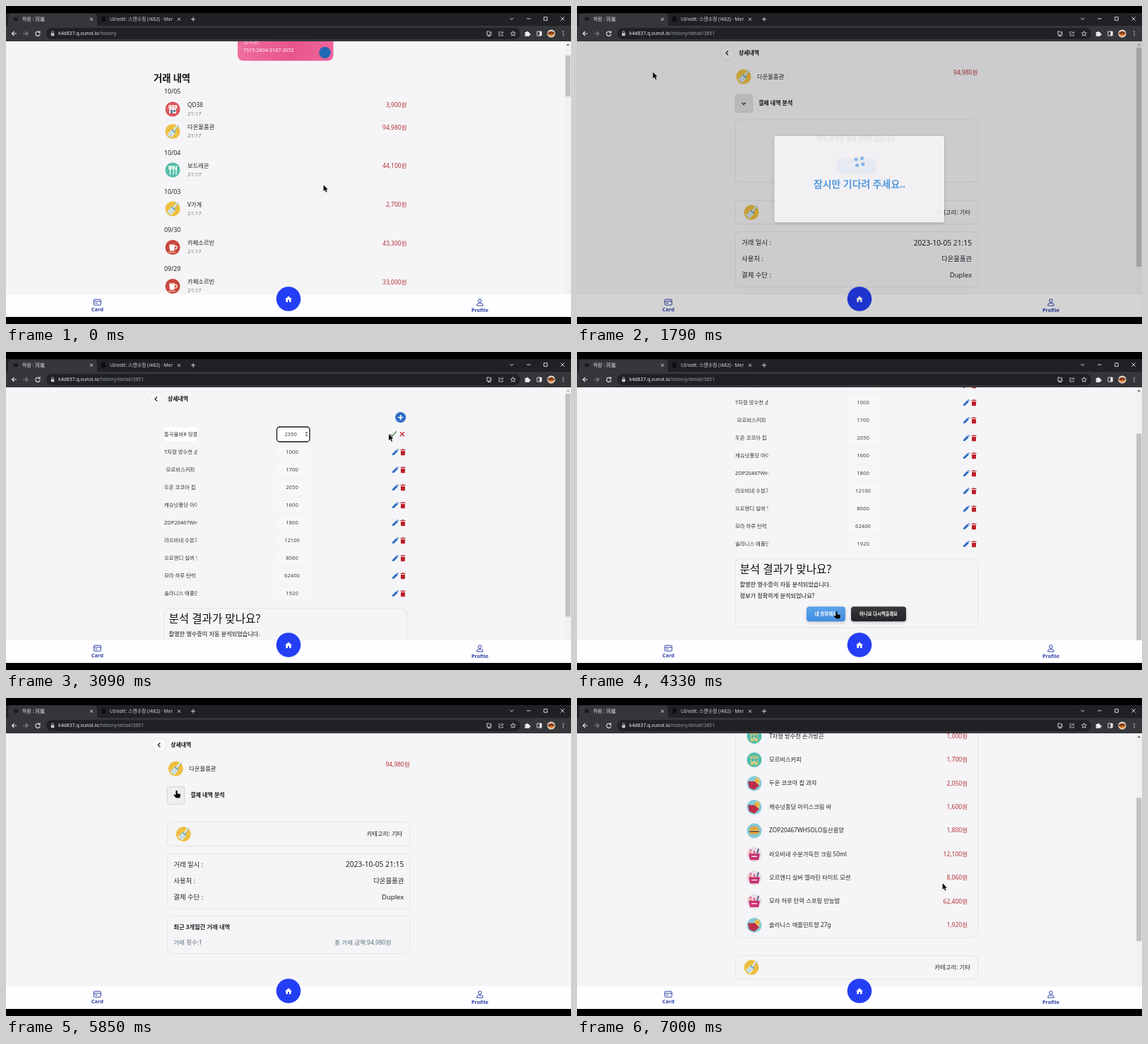
These frames come from a looping animation (800x450 px, 7.03 s). An HTML page with a canvas:

```html
<!DOCTYPE html>
<html lang="ko">
<head>
<meta charset="utf-8">
<style>
html, body { margin: 0; width: 100%; height: 100%; overflow: hidden; background: #000; }
canvas { display: block; }
</style>
</head>
<body>
<canvas id="stage" width="800" height="450"></canvas>
<script>
const c = document.getElementById('stage').getContext('2d');
const LOOP = 7030;
const FONT = '"Noto Sans", "Noto Sans CJK KR", sans-serif';
const RED = '#b3333a', BLUE = '#2c40a8', INK = '#25242a';
const STORE = '다온물품관';

const history = [
  ['10/05', 121], ['10/04', 208], ['10/03', 262.5], ['09/30', 317], ['09/29', 372]
];
const spending = [
  ['shop', 'QD38', '3,900원', 146], ['brush', STORE, '94,980원', 177.5],
  ['fork', '보드레온', '44,100원', 232], ['brush', 'V가게', '2,700원', 287],
  ['cup', '카페소르빈', '43,300원', 341.5], ['cup', '카페소르빈', '33,000원', 396.5]
];
const items = [
  ['통곡물바R 땅콩버터', 2350, 'snack'],
  ['T자형 방수천 손가방끈', 1000, 'drink'],
  ['모르비스커피', 1700, 'drink'],
  ['두온 코코아 칩 과자', 2050, 'snack'],
  ['캐슈넛퐁당 아이스크림 바', 1600, 'snack'],
  ['ZOP20467WHSOLO등산용양', 1800, 'burger'],
  ['라오비네 수분가득한 크림 50ml', 12100, 'makeup'],
  ['오르엔디 실버 엘라틴 타이트 모션', 8060, 'makeup'],
  ['모라 하루 탄력 스프링 만능밤', 62400, 'makeup'],
  ['솔라니스 애플민트향 27g', 1920, 'snack']
];

// Disc colour, then parts: colour, path, optional line width
const icons = {
  shop: ['#dc555b', ['#f7e9e4', 'M-5-1H5V6H-5Z'], ['#f3b9b4', 'M-6-6H6L7-1H-7Z'],
    ['#5b7f9d', 'M-3 1H0V6H-3ZM1 1H4V4H1Z'], ['#fff', 'M-3-6V-1M1-6V-1M5-6V-1', 1.3]],
  brush: ['#edbf42', ['#d9e8ec', 'M7.5-9.5L1-1', 2.6], ['#8f9a94', 'M8.5-8.5L2.5-.5', .7],
    ['#e3edee', 'M-1-3L4 1L-2 9L-8 4Z'], ['#5d9fc4', 'M-1-3L4 1L3 2.5L-2-1.5Z'],
    ['#6aa7c6', 'M-2.5 0L-6 5M0 2L-4 7.5', .9]],
  fork: ['#55bda9', ['#fff', 'M-5-6V-2Q-5 0-3.5 0Q-2-0-2-2V-6M-3.5-6V7M1-6V7M5 0V7', 1.2],
    ['#fff', 'M-.5-6H2.5V-1H-.5ZM3.5 0Q3.5-7 6-6V0Z']],
  cup: ['#c9473d', ['#fff', 'M-5-4H3L2 5H-4Z'], ['#fff', 'M3-2Q7-2 6 1Q5 3 2.5 2.5', 1.3],
    ['#ecc9b9', 'M-5-4H3V-2.5H-5Z'], ['#edc39f', 'M-6 7H4', 1.2]],
  drink: ['#54bfa9', ['#e9c46a', 'M-6-5H6V-3H-6ZM-5 3H-1V7H-5ZM1 3H5V7H1Z'],
    ['#f8e8bd', 'M-4-2V2M0-2V5M4-2V2', 1.5], ['#3d7f78', 'M-6 0H6', .8]],
  snack: ['#86cbd8', ['#f0c24d', 'M-1-3L4-9L8-5L6 3Z'], ['#b92f49', 'M-9-3L1-3L7 3L0 9L-7 6Z'],
    ['#df8d35', 'M2-5L6-3', 1.2]],
  burger: ['#86c9d4', ['#e6a13d', 'M-7-1Q-6-6 0-6Q6-6 7-1Z'], ['#e6a13d', 'M-7 2H7Q6 5 4 5H-4Q-6 5-7 2Z'],
    ['#7b4a31', 'M-7 1H7', 1.8], ['#f5d95b', 'M-7-.5H7', 1]],
  makeup: ['#eadbe6', ['#c9316f', 'M-8-1H8L6 8H-6Z'], ['#d75b8d', 'M-5-1V-7M0-1V-5', 2.4],
    ['#59638f', 'M4-1L6-8', 2], ['#f3b49b', 'M-8-5H-4V-2H-8Z'], ['#fff', 'M-4 3H4', 1.3]]
};

const clamp = v => Math.max(0, Math.min(1, v));
const ramp = (t, a, b) => clamp((t - a) / (b - a));
const ease = p => p * p * (3 - 2 * p);

function text(s, x, y, size, color = INK, weight = 400, align = 'left') {
  c.font = `${weight} ${size}px ${FONT}`;
  c.fillStyle = color;
  c.textAlign = align;
  c.fillText(s, x, y + size * .36);
  return c.measureText(s).width;
}
function paint(fill, stroke, width = 1) {
  if (fill) { c.fillStyle = fill; c.fill(); }
  if (stroke) { c.strokeStyle = stroke; c.lineWidth = width; c.stroke(); }
}
function box(x, y, w, h, r, fill, stroke, width) {
  c.beginPath();
  c.roundRect(x, y, w, h, r);
  paint(fill, stroke, width);
}
function disc(x, y, r, fill, stroke, width) {
  c.beginPath();
  c.arc(x, y, r, 0, 7);
  paint(fill, stroke, width);
}
function path(d, x, y, fill, stroke, width = 1) {
  const p = new Path2D(d);
  c.save();
  c.translate(x, y);
  if (fill) { c.fillStyle = fill; c.fill(p); }
  if (stroke) { c.strokeStyle = stroke; c.lineWidth = width; c.stroke(p); }
  c.restore();
}
function clipped(x, y, w, h, draw) {
  c.save();
  c.beginPath();
  c.rect(x, y, w, h);
  c.clip();
  draw();
  c.restore();
}
function icon(kind, x, y) {
  const [back, ...parts] = icons[kind];
  disc(x, y, 10.5, back);
  for (const [color, d, width] of parts) path(d, x, y, width ? null : color, width && color, width);
}
const panel = (y, h) => box(224, y, 343.5, h, 7, null, '#e4e3e6');

function button(label, x, y, w, top, bottom, size) {
  const g = c.createLinearGradient(0, y, 0, y + 21);
  g.addColorStop(0, top);
  g.addColorStop(1, bottom);
  c.save();
  c.shadowColor = '#0003';
  c.shadowBlur = 4;
  c.shadowOffsetY = 1.5;
  box(x, y, w, 21, 4, g);
  c.restore();
  text(label, x + w / 2, y + 10.3, size, '#fff', 700, 'center');
}

function historyPage() {
  const g = c.createLinearGradient(328, 0, 463, 0);
  g.addColorStop(0, '#ef6d9c');
  g.addColorStop(.55, '#e8558d');
  g.addColorStop(1, '#f0659b');
  box(328, 0, 135.5, 77.5, 8, g);
  text('한가온', 336, 50, 8, '#fff');
  text('7315-2604-9187-3052', 336, 62, 7.1, '#fff');
  text('· ····', 338, 74, 6, '#f7a9c5');
  disc(451.5, 66, 8.3, '#2468b4');
  text('거래 내역', 209, 102, 13.2, '#111', 700);
  for (const [date, y] of history) text(date, 224, y, 8.8);
  for (const [kind, name, price, y] of spending) {
    icon(kind, 236, y);
    text(name, 257, y - 6, 8.3);
    text('21:17', 257, y + 6, 7.7, '#77767b');
    text(price, 567.5, y - 6, 8.5, RED, 400, 'right');
    box(224, y + 15, 343, .7, 0, '#efeef1');
  }
}

function header() {
  disc(212.5, 66.5, 10, '#f8f7f9', '#e5e4e7');
  path('M1.5-3L-1.5 0L1.5 3', 212.5, 66.5, null, '#222', 1.2);
  text('상세내역', 229, 66, 7.9, '#111', 700);
}

function detailPage(view, t) {
  header();
  icon('brush', 236, 100);
  text(STORE, 255, 100, 8.3);
  text('94,980원', 567.5, 94, 8.5, RED, 400, 'right');
  box(224, 125.5, 24.5, 25, 2, view === 'empty' ? '#e0dee0' : '#eeedf0', '#cfced1', .8);
  path('M-2.7-1.3L0 1.4L2.7-1.3', 236, 138, null, '#222', 1.2);
  text('결제 내역 분석', 257, 137, 8, '#111', 700);

  let y = 175.7;
  if (view === 'empty') {
    panel(161, 88.5);
    text('아직 분석한 결제 내역이 없습니다.', 396, 188.5, 7.9, '#111', 700, 'center');
    const pressed = t > 820 && t < 1100;
    button('영수증 등록', 368, 216, 55, pressed ? '#69aaea' : '#5ba3ea', pressed ? '#58a0e8' : '#448fe0', 6.3);
    y = 275;
  } else if (view === 'full') {
    panel(161, 336);
    items.forEach(([name, price, kind], i) => {
      const row = 178.8 + i * 33.4;
      icon(kind, 251, row);
      text(name, 272, row - .5, 8.3);
      text(price.toLocaleString('en-US') + '원', 553, row - .5, 8.5, RED, 400, 'right');
    });
    y = 522.3;
  }

  panel(y, 33.5);
  icon('brush', 247, y + 17);
  text('카테고리: 기타', 557, y + 16.5, 8.4, INK, 400, 'right');
  panel(y + 44.5, 78);
  [['거래 일시 :', '2023-10-05 21:15', 10.25], ['사용처 :', STORE, 9.3], ['결제 수단 :', 'Duplex', 9.5]]
    .forEach(([label, value, size], i) => {
      text(label, 233, y + 60 + i * 23, 9.4);
      text(value, 559, y + 60 + i * 23, size, INK, 400, 'right');
    });
  panel(y + 133, 53);
  text('최근 3개월간 거래 내역', 233, y + 148, 8.3, INK, 600);
  text('거래 횟수:1', 233, y + 170, 8.5, '#5d7480');
  text('총 거래 금액:94,980원', 461, y + 170, 8.5, '#5d7480');
}

function reviewPage(editing) {
  header();
  disc(558.7, 92.5, 7.6, '#2f6fc6');
  path('M-3.5 0H3.5M0-3.5V3.5', 558.7, 92.5, null, '#fff', 1.6);
  items.forEach(([name, price], i) => {
    const y = 116.3 + i * 25, edit = editing && !i;
    if (edit) {
      box(224, y - 10, 46.5, 20, 3, '#fff');
      box(383.5, y - 10.3, 46.5, 21, 4, '#fff', '#161616', 1.3);
      path('M-2-1L0-3.5L2-1ZM-2 1L0 3.5L2 1Z', 425.5, y, '#555');
      path('M-4 0L-1 3L5-4', 548, y, null, '#4d8a50', 1.4);
      path('M-3-3L3 3M3-3L-3 3', 561, y, null, '#c03036', 1.5);
    } else {
      box(383.5, y - 9, 46.5, 18, 3, '#f7f6f8');
      path('M-4 4V1.8L1.7-3.9L3.9-1.7L-1.8 4ZM2.4-4.5L3.3-5.2L5.2-3.3L4.5-2.4Z', 551, y + .8, '#2f6fc6');
      path('M-3-2H3V3.3Q3 4.3 2 4.3H-2Q-3 4.3-3 3.3ZM-3.6-4H-1.5L-1-4.6H1L1.5-4H3.6V-2.8H-3.6Z', 562, y + .6, '#bd2029');
    }
    c.font = `400 7.4px ${FONT}`;
    const w = c.measureText(name).width;
    clipped(224, y - 10, 46.5, 20, () => text(name, Math.max(224, 247 - w / 2), y - .3, 7.4, '#333'));
    text(price, edit ? 403 : 405, y - .3, 7.7, '#444', 400, 'center');
  });
  panel(362.8, 97);
  text('분석 결과가 맞나요?', 230.5, 377.5, 15.6, '#111', 500);
  text('촬영한 영수증이 자동 분석되었습니다.', 230.5, 399.3, 8.2, '#111', 500);
  text('정보가 정확하게 분석되었나요?', 230.5, 415, 8.2, '#111', 500);
  button('네 정확해요', 325, 430.3, 55, '#5ba3ea', '#3f8ce0', 6.5);
  button('아니요 다시찍을래요', 388, 430.3, 78, '#3c393d', '#242226', 6.3);
}

function scrollbar(height, top) {
  box(791.5, 50, 8.5, 390, 0, '#f1f1f1');
  path('M-2.2 1L0-1.4L2.2 1Z', 795.7, 55, top ? '#555' : '#a8a8a8');
  box(792.2, 59 + top * 372 / height, 7, 390 * 372 / height, 0, '#c1c1c1');
}

function navigation() {
  box(0, 408, 800, 32, 0, '#fefdff');
  box(124.3, 415.2, 10, 8, 1, null, BLUE, 1);
  path('M-5 0H5M-3 2.5H0', 129.3, 418, null, BLUE, 1.2);
  text('Card', 129.3, 429.7, 7.4, BLUE, 600, 'center');
  disc(671, 417, 2.3, null, BLUE, 1);
  path('M-4.2 4V3Q-4 .5-1.5.5H1.5Q4 .5 4.2 3V4Z', 671, 420, null, BLUE, 1);
  text('Profile', 671, 430, 7.4, BLUE, 600, 'center');
  disc(400, 414.5, 17.3, '#243ef5');
  path('M0-4.5L5 0H3.6V4H1V1H-1V4H-3.6V0H-5Z', 400, 415, '#fff');
}

function waiting(alpha, t) {
  if (!alpha) return;
  c.save();
  c.globalAlpha = alpha;
  box(0, 50, 800, 390, 0, 'rgba(0,0,0,.19)');
  c.shadowColor = '#0003';
  c.shadowBlur = 5;
  c.shadowOffsetY = 1;
  box(279.5, 184, 240.5, 122, 3, '#fbf9fc');
  c.shadowColor = 'transparent';
  for (let i = 0; i < 4; i++) {
    const a = .61 + (t - 1790) / 95 + i * Math.PI / 2;
    disc(400 + 6 * Math.cos(a), 220.5 + 6 * Math.sin(a), 2.5, '#76ace6');
  }
  text('잠시만 기다려 주세요..', 400, 251.5, 13.9, '#4390de', 600, 'center');
  c.restore();
}

function browser(url) {
  const line = (d, x, y, color = '#d5d6d8', width = 1) => path(d, x, y, null, color, width);
  const cross = 'M-2-2L2 2M2-2L-2 2';
  box(0, 0, 800, 10, 0, '#000');
  box(0, 10, 800, 18, 0, '#202124');
  box(3, 10.5, 126, 20, [5, 5, 0, 0], '#35363a');
  box(0, 28, 800, 22, 0, '#35363a');
  box(11, 16, 6, 5, 0, '#1c1c1e');
  text('하람 : 河嵐', 23, 18.5, 6.9, '#e6e6e8');
  line(cross, 121, 18.7);
  box(135.5, 15, 5, 7, 0, '#0c0c0d');
  clipped(146, 11, 90, 16, () => text('UI/edit: 스캔수정 (!482) · Merge requests', 147, 18.5, 6.9, '#d5d6d8'));
  line(cross, 245, 18.7);
  line('M-3 0H3M0-3V3', 265, 18.7);
  line('M-2.5-1L0 1.3L2.5-1', 716, 18);
  line('M-2.7 0H2.7', 740, 18);
  line('M-2.3-2.3H2.3V2.3H-2.3Z', 764, 18);
  line('M-2.6-2.6L2.6 2.6M2.6-2.6L-2.6 2.6', 788, 18);

  line('M3.5 0H-3M0-3L-3 0L0 3', 11.5, 39, '#e8e9ea', 1.1);
  line('M-3.5 0H3M0-3L3 0L0 3', 28, 39, '#85868a', 1.1);
  line('M2.4-2A3.2 3.2 0 1 0 3.2.6M3-3.8V-1.2H.4', 45, 39, '#e8e9ea', 1.1);
  box(57, 31, 671, 16, 8, '#202124');
  box(63.7, 38.3, 4.6, 4, .7, '#c3c5c8');
  line('M-1.3 0V-1.2A1.3 1.3 0 0 1 1.3-1.2V0', 66, 38.2, '#c3c5c8', .8);
  const w = text('k4d837.q.vunol.io', 74, 39, 6.9, '#eceded');
  text(url, 74 + w, 39, 6.9, '#9aa0a6');

  line('M0-3H-3V2H3V0M-2 3.5H2M2-3.5V-.5M.5-1.7L2-.4L3.5-1.7', 684, 39);
  line('M-1-2.5H-3V3H2.5V1M-1 1Q-.5-1.7 3-1.7M1.3-3.4L3-1.7L1.3 0', 701, 39, '#aeb0b3');
  line('M0-3.4L1-1.1L3.5-.9L1.6.8L2.2 3.2L0 1.9L-2.2 3.2L-1.6.8L-3.5-.9L-1-1.1Z', 718, 39, '#d5d6d8', .9);
  path('M-3.3-2H-1.2A1.2 1.2 0 1 1 1.2-2H3V0A1.2 1.2 0 1 1 3 2.2V3.7H-3.3V2A1.3 1.3 0 0 0-3.3-.3Z', 738, 39, '#eceded');
  line('M-3-3H3V3H-3Z', 755, 39);
  box(755.5, 36, 3, 6, 0, '#eceded');
  disc(772, 39, 5.6, '#ece0d3');
  path('M-5-1Q0-6 5-1L3 2H-4Z', 772, 39, '#8c3f1f');
  path('M-4 1H4L2 4H-2Z', 772, 39, '#e08a35');
  for (const y of [36.3, 39, 41.7]) disc(789, y, .8, '#e4e5e6');
}

// Time, x, y, hand shape
const moves = [
  [0, 449.5, 253, 0], [60, 449.5, 253, 0], [300, 300, 173, 1], [420, 300, 173, 0],
  [570, 240, 133, 1], [650, 240, 133, 0], [820, 402, 227, 0], [1050, 402, 227, 0],
  [1420, 107.5, 93.5, 0], [2640, 107.5, 93.5, 0], [2820, 550, 114, 1], [2900, 550, 114, 0],
  [2970, 418, 116, 0], [3010, 418, 116, 0], [3090, 542, 116, 0], [3160, 547, 115, 1],
  [3680, 547, 115, 0], [4200, 367.5, 367, 1], [5180, 367.5, 367, 0], [5700, 241.5, 131, 1],
  [5980, 241.5, 131, 0], [6320, 517.5, 262, 0], [LOOP, 517.5, 262, 0]
];

function cursor(t) {
  const i = moves.findIndex(m => m[0] > t) - 1;
  const [a, x, y, hand] = moves[i], [b, nx, ny] = moves[i + 1];
  const p = ease(ramp(t, a, b));
  const d = hand
    ? 'M-1.2.4Q0-1 1.2.4V4L5 5Q6 5.4 5.6 7L4.6 10.5H-.8L-4 6.5Q-3.4 5-1.2 6.3Z'
    : 'M0 0V9.3L2.1 7.3L3.7 10.8L5.2 10.1L3.7 6.8H6.5Z';
  path(d, x + (nx - x) * p, y + (ny - y) * p, '#000', '#fff6', .5);
}

function render(t) {
  const view = t < 420 ? 'history' : t < 650 ? 'closed' : t < 2620 ? 'empty'
    : t < 5000 ? 'review' : t < 5910 ? 'closed' : 'full';
  const top = {
    history: 74,
    review: 70 * ease(ramp(t, 3760, 4080)),
    full: 158 * ease(ramp(t, 6340, 6980))
  }[view] || 0;
  const height = { history: 2500, empty: 468, review: 460, full: 715 }[view];

  box(0, 0, 800, 450, 0, '#000');
  clipped(0, 50, 800, 390, () => {
    box(0, 50, 800, 390, 0, '#f5f4f6');
    c.save();
    c.translate(height ? 0 : 4.3, view === 'history' ? 0 : -top);
    if (view === 'history') historyPage();
    else if (view === 'review') reviewPage(t > 2870 && t < 3230);
    else detailPage(view, t);
    c.restore();
    if (height) scrollbar(height, top);
    navigation();
    if (t < 2620) waiting(ramp(t, 1740, 1797), t);
    else if (t < 5000) waiting(ramp(t, 4460, 4517), t);
  });
  browser(view === 'history' ? '/history' : '/history/detail/3851');
  cursor(t);
}

const start = performance.now();
function tick() {
  render((performance.now() - start) % LOOP);
  requestAnimationFrame(tick);
}
tick();
</script>
</body>
</html>
```
